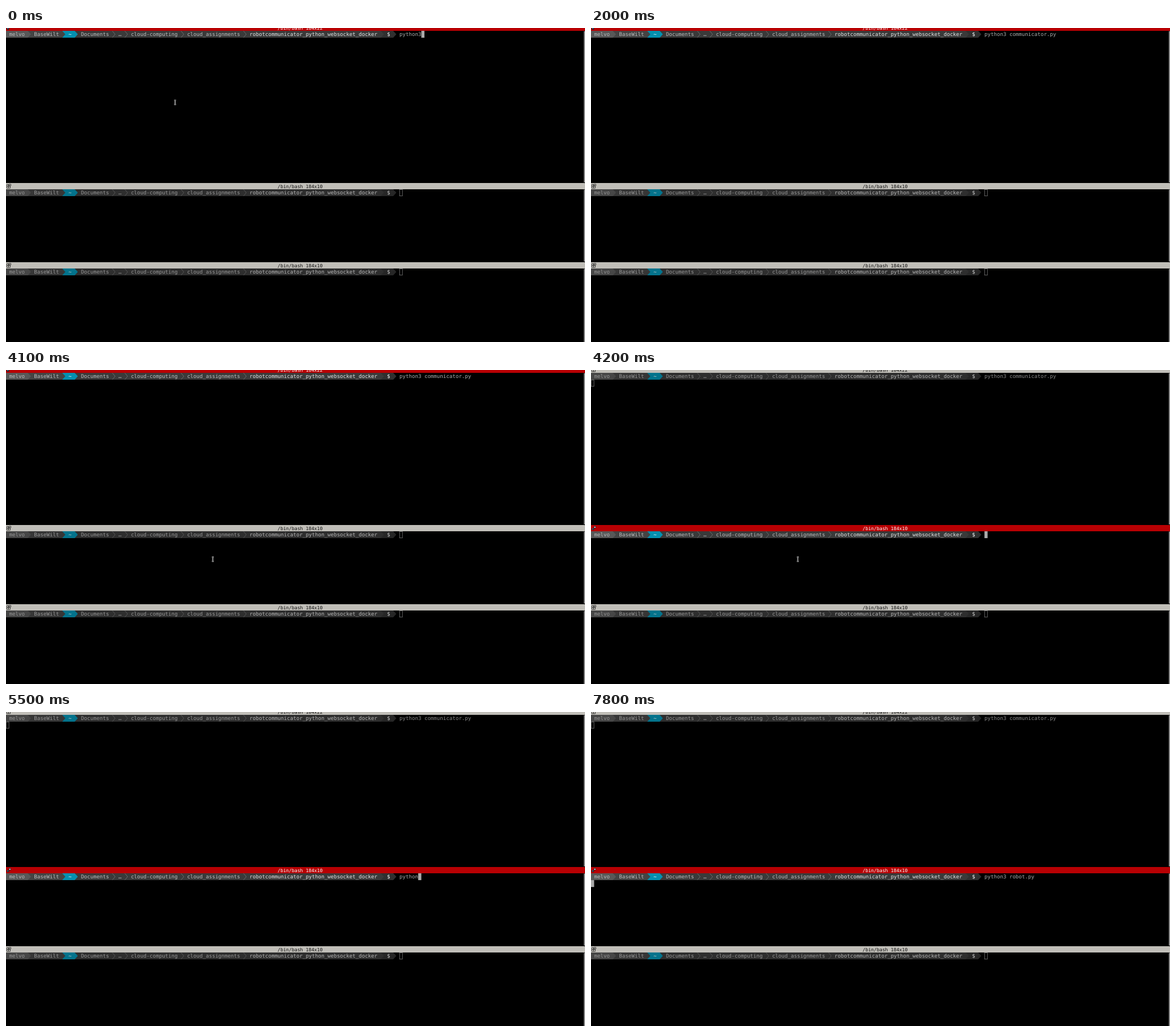
These frames come from a looping animation (1017 by 551 pixels, 8000 ms). An HTML page:

```html
<!DOCTYPE html>
<html lang="en">
<head>
<meta charset="utf-8">
<title>Split terminal</title>
<style>
  html, body { margin: 0; width: 100%; height: 100%; overflow: hidden; background: #000; }
  svg { display: block; }
  text { font-family: "DejaVu Sans Mono", monospace; white-space: pre; text-rendering: geometricPrecision; }
  .term text { font-size: 9.11px; }
  .title { font-size: 8.23px; }
</style>
</head>
<body>
<svg id="stage" width="1017" height="551" viewBox="0 0 1017 551"></svg>
<script>
const LOOP = 8000;
const CW = 5.485, ROW = 12.05, BAR = 11;
const PROMPT_END = 126;
const stage = document.getElementById('stage');

function el(parent, tag, attrs, text) {
  const node = document.createElementNS('http://www.w3.org/2000/svg', tag);
  for (const key in attrs) node.setAttribute(key, attrs[key]);
  if (text) node.textContent = text;
  parent.appendChild(node);
  return node;
}
const rect = (parent, x, y, width, height, fill) => el(parent, 'rect', { x, y, width, height, fill });
const show = (node, on) => node.setAttribute('visibility', on ? 'visible' : 'hidden');

// Prompt segments: start column, end column, background
const SEGMENTS = [
  [0, 7, '#585858'], [7, 18, '#444444'], [18, 22, '#0490b0'],
  [22, 120, '#3a3a3a'], [120, 124, '#303030']
];
// Prompt words: column, text, colour
const WORDS = [
  [1, 'melvo', '#bcbcbc'], [9, 'BaseWilt', '#bcbcbc'], [20, '~', '#ffffff'],
  [24, 'Documents', '#bcbcbc'], [36, '…', '#bcbcbc'],
  [40, 'cloud-computing', '#bcbcbc'], [58, 'cloud_assignments', '#bcbcbc'],
  [78, 'robotcommunicator_python_websocket_docker', '#e4e4e4'], [122, '$', '#ffffff']
];
const CHEVRONS = [34, 38, 56, 76];

function word(parent, col, text, fill) {
  return el(parent, 'text', { x: col * CW, y: 9.3, fill }, text);
}

function drawPrompt(g) {
  // Right to left, so that each arrow overlaps the next segment
  for (const [from, to, fill] of [...SEGMENTS].reverse()) {
    const a = from * CW, b = to * CW;
    el(g, 'path', { d: `M${a} 0H${b}L${b + CW} ${ROW / 2}L${b} ${ROW}H${a}Z`, fill });
  }
  for (const col of CHEVRONS) {
    el(g, 'path', {
      d: `M${col * CW + 0.3} 0.3l${CW - 0.6} ${ROW / 2 - 0.3}l${0.6 - CW} ${ROW / 2 - 0.3}`,
      fill: 'none', stroke: '#808080', 'stroke-width': 0.7
    });
  }
  for (const [col, text, fill] of WORDS) word(g, col, text, fill);
}

function drawIcons(g) {
  const idle = el(g, 'g', {});
  el(idle, 'path', {
    d: 'M1.5 2.5h3v3h-3zM1.5 5.5h3v3.5h-3zM4.5 5.5h3v3.5h-3zM5.5 2h3v3h-3z',
    fill: 'none', stroke: '#222', 'stroke-width': 0.8
  });
  const live = el(g, 'g', {});
  rect(live, 1.5, 5.3, 3.8, 3.6, '#222');
  rect(live, 2.3, 6, 1.8, 1.6, '#4a7ab0');
  rect(live, 5, 2.3, 3.6, 3.4, '#222');
  rect(live, 5.7, 2.9, 2.1, 2, '#d5e2ee');
  return { idle, live };
}

function makePane(top, bottom, title) {
  const bar = el(stage, 'g', { transform: `translate(0 ${top - BAR})` });
  const fill = rect(bar, 0, 0, 1017, BAR, '#c0beb8');
  const label = el(bar, 'text', { class: 'title', x: 477, y: 8.8 }, title);
  const icons = drawIcons(bar);
  rect(stage, 1014.9, top + 0.5, 2.1, bottom - top - 0.5, '#8c8c8c');

  const term = el(stage, 'g', { class: 'term', transform: `translate(0 ${top})` });
  drawPrompt(term);
  const command = word(term, PROMPT_END, '', '#aaaaaa');
  const block = rect(term, 0, 0, CW, ROW, '#aaaaaa');
  const hollow = el(term, 'rect', {
    width: CW - 0.7, height: ROW - 0.7, fill: 'none', stroke: '#aaaaaa', 'stroke-width': 0.7
  });

  return function update(active, [, typed, mode]) {
    fill.setAttribute('fill', active ? '#b80003' : '#c0beb8');
    label.setAttribute('fill', active ? '#ffffff' : '#111111');
    show(icons.live, active);
    show(icons.idle, !active);
    term.setAttribute('opacity', active ? 1 : 0.8);
    command.textContent = typed;
    const below = mode.startsWith('below');
    const x = below ? 0 : (PROMPT_END + typed.length) * CW;
    const y = below ? ROW : 0;
    block.setAttribute('x', x);
    block.setAttribute('y', y);
    hollow.setAttribute('x', x + 0.35);
    hollow.setAttribute('y', y + 0.35);
    show(block, active && !mode.endsWith('off'));
    show(hollow, !active);
  };
}

const panes = [
  makePane(5, 271, '/bin/bash 184x22'),
  makePane(283, 410, '/bin/bash 184x10'),
  makePane(422, 551, '/bin/bash 184x10')
];

const pointer = el(stage, 'g', {});
for (const [stroke, width] of [['#dddddd', 1.9], ['#000000', 0.6]]) {
  el(pointer, 'path', {
    d: 'M-1.6 -3.8H1.6M0 -3.8V3.8M-1.6 3.8H1.6',
    fill: 'none', stroke, 'stroke-width': width
  });
}

// Typing: time, command text, cursor mode
const FIRST = 'python3 communicator.py ';
const SECOND = 'python3 robot.py ';
const TYPING = [
  [
    [0, FIRST.slice(0, 7), 'on'], [400, FIRST.slice(0, 8), 'on'],
    [1000, FIRST.slice(0, 9), 'on'], [1100, FIRST.slice(0, 10), 'on'],
    [1300, FIRST.slice(0, 11), 'on'], [1500, FIRST, 'on'],
    [2000, FIRST, 'off'], [2300, FIRST, 'on'], [2400, FIRST, 'below'],
    [3000, FIRST, 'below off'], [3600, FIRST, 'below'],
    [4100, FIRST, 'below off']
  ],
  [
    [0, '', 'on'],
    ...[4600, 4800, 4900, 5100, 5300, 5500, 6100, 6300, 6800, 6900]
      .map((time, i) => [time, SECOND.slice(0, i + 1), 'on']),
    [7100, SECOND, 'on'], [7700, SECOND, 'off'], [7800, SECOND, 'below']
  ],
  [[0, '', 'on']]
];
const FOCUS = [[0, 0], [4200, 1]];
// Pointer: time, x, y; no place means hidden while typing
const POINTER = [
  [0, 297, 130.4], [400], [3500, 297, 130.4], [3600, 318, 190],
  [3700, 352, 281], [3900, 360.5, 305], [4100, 363.3, 332], [4600]
];

const at = (steps, t) => steps.findLast(step => step[0] <= t);

function render(t) {
  const focus = at(FOCUS, t)[1];
  panes.forEach((update, i) => update(i === focus, at(TYPING[i], t)));
  const [, x, y] = at(POINTER, t);
  show(pointer, x !== undefined);
  if (x !== undefined) pointer.setAttribute('transform', `translate(${x} ${y})`);
}

const start = performance.now();
function tick() {
  render((performance.now() - start) % LOOP);
  requestAnimationFrame(tick);
}
tick();
</script>
</body>
</html>
```
